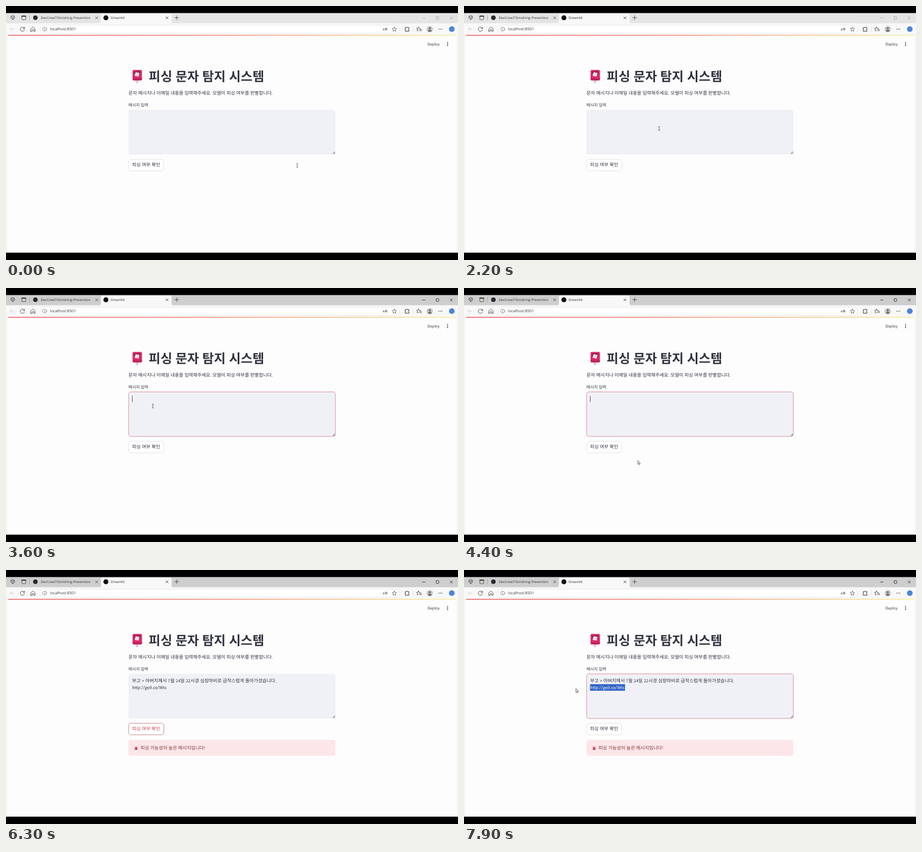
Recreate the animation shown at these times as an HTML page. Size 800x450 px, loop 8000 ms.

```html
<!DOCTYPE html>
<html lang="ko">
<head>
<meta charset="utf-8">
<title>Streamlit</title>
<style>
html, body { margin: 0; width: 100%; height: 100%; overflow: hidden; background: #000; }
svg { display: block; width: 800px; height: 450px; }
text { font: 8.23px "Noto Sans CJK KR", "Noto Sans CJK", "Noto Sans CJK JP", sans-serif;
  fill: #31333f; word-spacing: -.024em; text-rendering: geometricPrecision; white-space: pre; }
.l { font-size: .9em; }
.ui { font-family: "Open Sans", "Noto Sans", sans-serif; font-size: 6px; fill: #333; word-spacing: 0; }
.icon { fill: none; stroke: #3c3c3c; stroke-width: .8; stroke-linecap: round; stroke-linejoin: round; }

/* on/off states, all hard changes on one 8 s clock */
.bar, .win, .focus, .caret, .caret2, .msg, .live, .hot, .alert, .beam, .arrow, .hand {
  animation: 8s step-end infinite; }
.bar { animation-name: bar; }
.win { animation-name: win; }
.focus { animation-name: focus; }
.caret { animation-name: caret; }
.caret2 { animation-name: caret2; }
.msg { animation-name: msg; }
.live { animation-name: live; }
.hot { animation-name: hot; }
.alert { animation-name: alert; }
.beam { animation-name: beam; }
.arrow { animation-name: arrow; }
.hand { animation-name: hand; }
@keyframes bar { 0% { fill: #e4e4e4 } 41.25%, 100% { fill: #cecece } }
@keyframes win { 0% { stroke: #a3a3a3 } 41.25%, 100% { stroke: #222 } }
@keyframes focus { 0% { opacity: 0 } 41.25% { opacity: 1 } 70.6% { opacity: 0 } 87.5%, 100% { opacity: 1 } }
@keyframes caret { 0% { opacity: 0 } 41.25% { opacity: 1 } 47.5% { opacity: 0 } 53.7% { opacity: 1 } 58.7%, 100% { opacity: 0 } }
@keyframes caret2 { 0% { opacity: 0 } 58.7% { opacity: 1 } 65%, 100% { opacity: 0 } }
@keyframes msg { 0% { opacity: 0 } 58.7%, 100% { opacity: 1 } }
@keyframes live { 0% { opacity: 0 } 58.7% { opacity: 1 } 70.6%, 100% { opacity: 0 } }
@keyframes hot { 0% { opacity: 0 } 66% { opacity: 1 } 87.5%, 100% { opacity: 0 } }
@keyframes alert { 0% { opacity: 0 } 73.7%, 100% { opacity: 1 } }
@keyframes beam { 0% { opacity: 1 } 13.7% { opacity: 0 } 23.7% { opacity: 1 } 48.7% { opacity: 0 }
  82.5% { opacity: 1 } 95.2%, 100% { opacity: 0 } }
@keyframes arrow { 0% { opacity: 0 } 13.7% { opacity: 1 } 23.7% { opacity: 0 } 48.7% { opacity: 1 }
  66% { opacity: 0 } 95.2%, 100% { opacity: 1 } }
@keyframes hand { 0% { opacity: 0 } 66% { opacity: 1 } 73.7%, 100% { opacity: 0 } }

.pointer { animation: move 8s ease-in-out infinite; }
@keyframes move {
  0%, 12.5% { transform: translate(515.5px, 282.5px) }
  16.25%, 21.25% { transform: translate(553.5px, 236.5px) }
  31.25%, 46.25% { transform: translate(260px, 209px) }
  52.5%, 62.5% { transform: translate(307.5px, 305.5px) }
  67.5%, 81.25% { transform: translate(271px, 283.7px) }
  87.5% { transform: translate(285px, 208px) }
  90% { transform: translate(285px, 208px); animation-timing-function: linear }
  96.25%, 100% { transform: translate(198px, 210px) }
}
.drag { transform-origin: 285px 208px; animation: drag 8s linear infinite; }
@keyframes drag { 0%, 90% { transform: scaleX(0) } 94.45%, 100% { transform: scaleX(1) } }
</style>
</head>
<body>
<svg viewBox="0 0 800 450">
  <defs>
    <linearGradient id="strip"><stop stop-color="#f0454f"/><stop offset=".45" stop-color="#f07a62"/><stop offset="1" stop-color="#f8f08a"/></linearGradient>
    <clipPath id="picked"><rect class="drag" x="223" y="201" width="62" height="14"/></clipPath>
    <path id="x" d="M-2-2 2 2M2-2-2 2"/>
  </defs>

  <!-- browser frame -->
  <rect class="bar" y="12.5" width="800" height="30"/>
  <path d="M0 30.5H165Q168 30.5 168 27.5V16.5Q168 13.5 171 13.5H290Q293 13.5 293 16.5V27.5Q293 30.5 296 30.5H800V437H0Z" fill="#f8f8f8"/>
  <rect x="2" y="50.7" width="796" height="385.8" rx="3" fill="#fdfdfd" stroke="#f0f0f0" stroke-width=".6"/>
  <rect x="4" y="51.3" width="793" height="1.3" fill="url(#strip)"/>
  <rect x="60.5" y="33.8" width="636" height="14.4" rx="7.2" fill="#fff" stroke="#dedede" stroke-width=".7"/>

  <g class="icon">
    <path d="M9 18.5 12 16.5 15 18.5V22L12 24 9 22ZM9 18.5 12 20.3 15 18.5M12 20.3V24"/>
    <rect x="28" y="17.3" width="7" height="7" rx="1.2"/>
    <path d="M28 18.2H35" stroke-width="1.8"/>
    <path d="M41.5 16.5V25" stroke="#999" stroke-width=".7"/>
    <use href="#x" x="160.5" y="21"/><use href="#x" x="285" y="21"/>
    <path d="M298.5 20.7H305.5M302 17.2V24.2"/>
    <path d="M14.5 41H7.5M10.5 38 7.5 41 10.5 44" stroke="#c9c9c9"/>
    <path d="M32.5 39.5A3.8 3.8 0 1 0 32.8 42M32.9 37.3V39.8H30.4"/>
    <path d="M44 40.5 47.7 37.2 51.4 40.5V45H49.1V42H46.3V45H44Z"/>
    <g stroke="#666" stroke-width=".7"><circle cx="68.5" cy="41" r="3.5"/><path d="M68.5 40.7V43M68.5 39V39.1"/></g>
    <path d="M687.5 37.2 688.7 39.8 691.5 40.1 689.4 42 690 44.8 687.5 43.4 685 44.8 685.6 42 683.5 40.1 686.3 39.8Z" stroke-width=".7"/>
    <path d="M707 38.5H709A1.2 1.2 0 0 1 711.4 38.5H713.3V40.2A1.2 1.2 0 0 0 713.3 42.7V44.6H707Z" stroke-width="1"/>
    <path d="M730 37.2 731 39.5 733.5 39.8M730 37.2 729 39.5 726.5 39.8 728.4 41.5 727.8 44.2 730 43M732 41.5H735.5M732 43.7H735.5"/>
    <path d="M721 37V45" stroke="#d5d5d5" stroke-width=".6"/>
  </g>
  <g class="icon win">
    <path d="M737 21.3H742"/><rect x="761.3" y="19" width="4.7" height="4.7" rx=".8"/><use href="#x" x="788" y="21.3"/>
  </g>
  <circle cx="52" cy="20.7" r="4" fill="#24292f"/>
  <circle cx="176.8" cy="20.9" r="4.4" fill="#111318"/>
  <circle cx="789" cy="41" r="5" fill="#4b85d6"/>
  <circle cx="750" cy="41" r="5.6" fill="#c9c8c8"/>
  <circle cx="750" cy="39.5" r="1.9" fill="#77706f"/>
  <path d="M746.5 44.6Q747 42 750 42T753.5 44.6Q750 47.3 746.5 44.6Z" fill="#77706f"/>
  <g fill="#333">
    <circle cx="766" cy="41" r=".75"/><circle cx="768.7" cy="41" r=".75"/><circle cx="771.4" cy="41" r=".75"/>
    <circle cx="781.5" cy="64.6" r=".9"/><circle cx="781.5" cy="67.3" r=".9"/><circle cx="781.5" cy="70" r=".9"/>
  </g>
  <text class="ui" x="61.5" y="23">DevCrew7/Smishing-Prevention</text>
  <text class="ui" x="185" y="23">Streamlit</text>
  <text class="ui" x="78" y="43.4" style="font-size:6.8px">localhost:8501</text>
  <text x="666.5" y="43.2" style="font-size:5.9px">aあ</text>
  <text x="746" y="69.8" style="font-size:6.52px">Deploy</text>

  <!-- page -->
  <g>
    <path d="M229.8 130H234V136.5H229.8Z" fill="#e7bfcf"/>
    <rect x="224" y="113.3" width="16.6" height="18.5" rx="2.2" fill="#d92b68"/>
    <path d="M224 128H240.6V129.6A2.2 2.2 0 0 1 238.4 131.8H226.2A2.2 2.2 0 0 1 224 129.6Z" fill="#c2215c"/>
    <rect x="227" y="116" width="10.6" height="3.5" rx="1" fill="#7a1c4a"/>
    <path d="M229.3 117.3 236.2 118.2 234.6 125 227.8 123.8Z" fill="#eee3f0"/>
    <path d="M231.2 119.8 234.4 120.2" stroke="#a6a0c0" stroke-width=".8"/>
  </g>
  <text x="252.6" y="133" style="font-size:22.6px;font-weight:700">피싱 문자 탐지 시스템</text>
  <text x="216.8" y="156.6">문자 메시지나 이메일 내용을 입력해주세요<tspan class="l">.</tspan> 모델이 피싱 여부를 판별합니다<tspan class="l">.</tspan></text>
  <text x="216.8" y="177.8" style="font-size:7.2px">메시지 입력</text>

  <rect x="216.7" y="183.8" width="366.5" height="79.3" rx="4.2" fill="#f0f1f6"/>
  <rect class="focus" x="217" y="184" width="366" height="79" rx="4.2" fill="none" stroke="#d97d88" stroke-width=".8"/>
  <path class="icon" d="M578.5 261.8 582 258.3M580.7 261.8 582 260.5" stroke-width=".7"/>
  <path class="caret" d="M223.5 191V202" stroke="#31333f" stroke-width=".8"/>
  <path class="caret2" d="M285.5 203V214" stroke="#31333f" stroke-width=".8"/>
  <g class="msg">
    <text x="223.2" y="198.7">부고 <tspan class="l">&gt;</tspan> 아버지께서 <tspan class="l">7</tspan>월 <tspan class="l">24</tspan>일 <tspan class="l">22</tspan>시경 심장마비로 급작스럽게 돌아가셨습니다<tspan class="l">.</tspan></text>
    <text x="223.2" y="210.9"><tspan class="l">http://go9.co/Wts</tspan></text>
  </g>
  <g clip-path="url(#picked)">
    <rect x="223" y="202.3" width="62" height="11.6" fill="#2f62c4"/>
    <text x="223.2" y="210.9" style="fill:#fff"><tspan class="l">http://go9.co/Wts</tspan></text>
  </g>
  <g class="live">
    <path d="M223.5 212.7H285" stroke="#e0505c" stroke-width=".9" stroke-dasharray="1.4 .8"/>
    <text x="579" y="259.2" text-anchor="end" style="font-size:5.58px;fill:#8a8b94">Press Ctrl+Enter to apply</text>
  </g>

  <rect x="217" y="271.5" width="62.3" height="20.4" rx="4.2" fill="#fff" stroke="#dadade" stroke-width=".7"/>
  <text x="223.3" y="284.2">피싱 여부 확인</text>
  <g class="hot">
    <rect x="217" y="271.5" width="62.3" height="20.4" rx="4.2" fill="#fff" stroke="#cb7378" stroke-width=".8"/>
    <text x="223.3" y="284.2" style="fill:#d0484f">피싱 여부 확인</text>
  </g>

  <g class="alert">
    <rect x="216.7" y="300.8" width="366.5" height="28.4" rx="4.2" fill="#fde6e9"/>
    <path d="M227.6 312.6 228.5 313.3M230.4 311V312M233.2 312.6 232.3 313.3" stroke="#f08aa0" stroke-width=".8"/>
    <path d="M228.4 317V315.2A2 2 0 0 1 232.4 315.2V317Z" fill="#e0345a"/>
    <rect x="227.5" y="317" width="5.8" height="1.6" rx=".6" fill="#a84a63"/>
    <text x="238" y="317.6" style="fill:#7d353b">피싱 가능성이 높은 메시지입니다<tspan class="l">!</tspan></text>
  </g>

  <g class="pointer">
    <path class="beam" d="M-1.6-3.3H-.4L0-2.9.4-3.3H1.6M0-2.9V2.9M-1.6 3.3H-.4L0 2.9.4 3.3H1.6" fill="none" stroke="#444" stroke-width=".8"/>
    <path class="arrow" d="M0 0V6.7L1.5 5.3 2.5 7.6 3.6 7.1 2.6 4.9H4.6Z" fill="#fff" stroke="#333" stroke-width=".7"/>
    <path class="hand" d="M-.7.5Q0-.4.8.5V3.5L1.5 3.3 2.3 3.8 3.2 3.6 3.8 4.2 4.8 4.4V7.3L4 9.7H0L-2.3 6.3Q-2.5 5.1-1.4 5.4L-.7 6Z" fill="#fff" stroke="#333" stroke-width=".7"/>
  </g>
</svg>
</body>
</html>
```
